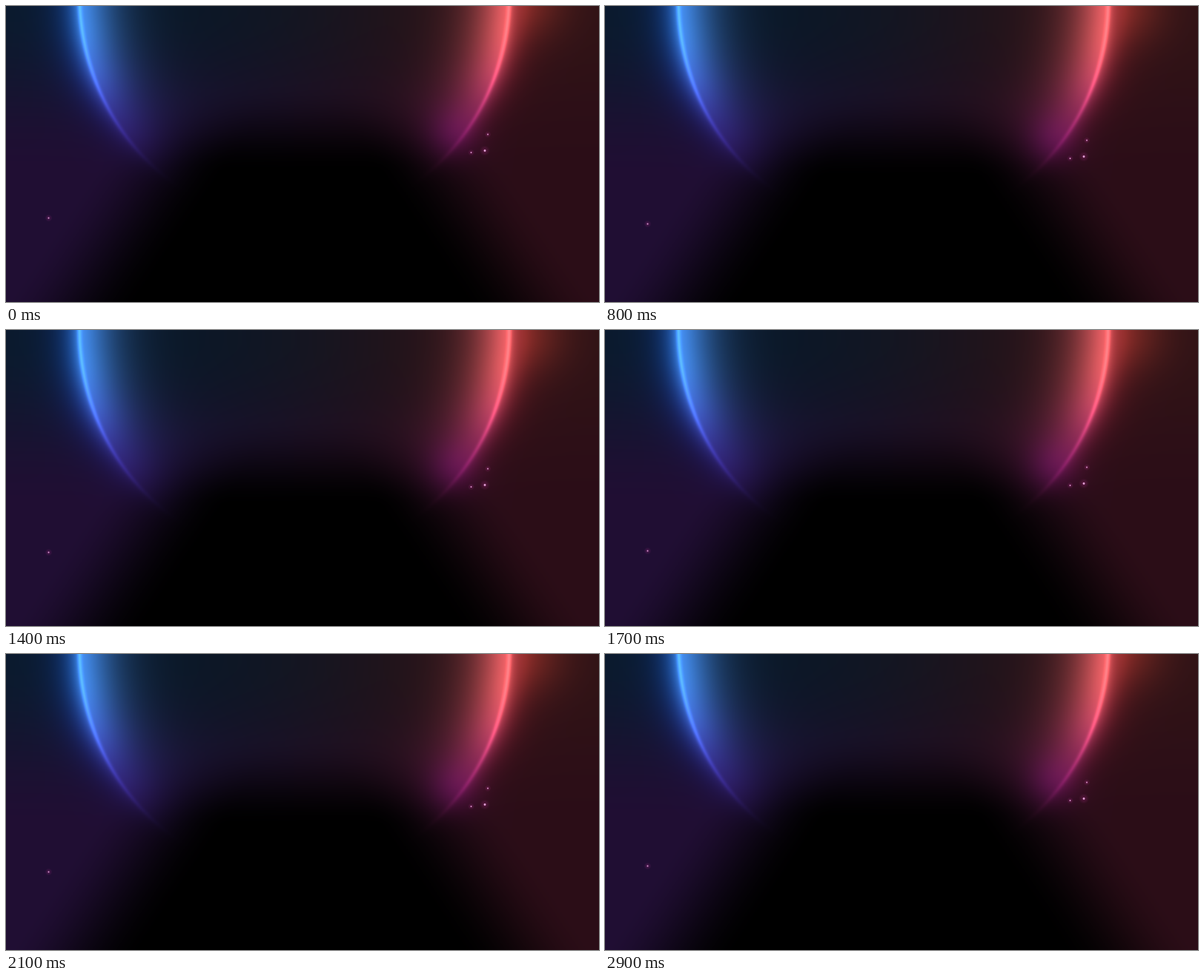
An HTML page with a canvas that plays this animation: 800 px wide and 400 px high, repeating every 3 s.

```html
<!DOCTYPE html>
<html lang="en">
<head>
<meta charset="utf-8">
<title>Glowing ring</title>
<style>
  html, body { margin: 0; width: 100%; height: 100%; overflow: hidden; background: #000; }
  canvas { display: block; width: 800px; height: 400px; }
</style>
</head>
<body>
<canvas id="stage" width="800" height="400"></canvas>
<script>
const start = performance.now();
const W = 800, H = 400, TRAVEL = 14;
const STEP = 100, STEPS = 30, REFRESH = 17;
const ring = { x: 388.5, y: -16, rx: 290, ry: 308 };

const blue = { skyTop: [11, 26, 44], skyLow: [32, 14, 51], rimTop: [72, 145, 245], rimLow: [58, 50, 190], reach: [11, 15, 20] };
const red = { skyTop: [48, 19, 22], skyLow: [43, 13, 23], rimTop: [240, 98, 100], rimLow: [165, 36, 122], reach: [17, 12, 13] };

const sparks = [
  { x: 57.5, y: 286.5, r: 1 },
  { x: 650, y: 173.5, r: 0.9 },
  { x: 627.5, y: 198, r: 0.9 },
  { x: 646, y: 195.5, r: 1.4 }
];

const clamp = v => Math.min(1, Math.max(0, v));
const mix = (a, b, t) => a + (b - a) * t;
const mixColour = (a, b, t) => a.map((v, i) => mix(v, b[i], t));
const smooth = (a, b, v) => { const t = clamp((v - a) / (b - a)); return t * t * (3 - 2 * t); };
const gauss = (dx, dy, s) => Math.exp(-(dx * dx + dy * dy) / (2 * s * s));

const skyAt = (side, y) => mixColour(side.skyTop, side.skyLow, smooth(0, 230, y));

function rimAt(side, y) {
  const fade = 1 - smooth(80, 268, y);
  return mixColour(side.rimTop, side.rimLow, smooth(20, 200, y)).map(v => v * fade);
}

// Light left visible around the dark dome
function visibility(x, y) {
  const side = Math.abs(x - 398) - (210 + (y - 250) * 0.67);
  return 1 - (1 - smooth(-92, 92, side)) * (1 - smooth(-52, 70, 172 - y));
}

// A thin bright line, a wide glow inside it and a short one outside
function rimLight(d, y, reach) {
  const line = 0.32 * Math.exp(-d * d / 9);
  const body = mix(0.82, 0.58, smooth(20, 200, y));
  const falloff = d < 0 ? Math.exp(-Math.pow(-d / 48, 1.4)) : Math.exp(-d / reach);
  return line + body * falloff;
}

function paintScene() {
  const scene = document.createElement("canvas");
  scene.width = W;
  scene.height = H + TRAVEL;
  const g = scene.getContext("2d");
  const image = g.createImageData(W, H + TRAVEL);
  let p = 0;
  for (let row = 0; row < H + TRAVEL; row++) {
    const y = row - TRAVEL;
    const leftSky = skyAt(blue, y), rightSky = skyAt(red, y);
    const leftRim = rimAt(blue, y), rightRim = rimAt(red, y);
    const dy = (y - ring.y) * ring.rx / ring.ry;
    for (let x = 0; x < W; x++) {
      const isLeft = x < ring.x;
      const rim = isLeft ? leftRim : rightRim;
      const reach = (isLeft ? blue : red).reach;
      const d = Math.hypot(x - ring.x, dy) - ring.rx;
      const sky = mixColour(leftSky, rightSky, Math.pow(smooth(120, 720, x), 1.4));
      const dim = 1 - 0.1 * smooth(0, -60, d);
      const light = visibility(x, y);
      const violet = gauss(x - 602, y - 175, 26);
      const ember = gauss(x - 706, y + 8, 36) * smooth(0, 25, d);
      const extra = [violet * 20 + ember * 48, ember * 16, violet * 26 + ember * 9];
      for (let c = 0; c < 3; c++) {
        image.data[p++] = light * (sky[c] * dim + rim[c] * rimLight(d, y, reach[c]) + extra[c]);
      }
      image.data[p++] = 255;
    }
  }
  g.putImageData(image, 0, 0);
  for (const { x, y, r } of sparks) paintSpark(g, x, y + TRAVEL, r);
  return scene;
}

function paintSpark(g, x, y, r) {
  const halo = g.createRadialGradient(x, y, 0, x, y, r * 5);
  halo.addColorStop(0, "rgba(190, 50, 150, 0.3)");
  halo.addColorStop(1, "rgba(190, 50, 150, 0)");
  g.fillStyle = halo;
  g.fillRect(x - 8, y - 8, 16, 16);
  g.fillStyle = "rgba(250, 185, 240, 0.85)";
  g.beginPath();
  g.arc(x, y, r, 0, Math.PI * 2);
  g.fill();
}

const ctx = document.getElementById("stage").getContext("2d");
const scene = paintScene();

// The picture drifts down a pixel per step, rests, and climbs back.
// A refresh of lead puts each step on screen on time.
function draw() {
  const time = performance.now() - start + REFRESH;
  const step = Math.floor(time / STEP) % STEPS;
  const drop = Math.min(step, STEPS - 1 - step);
  ctx.drawImage(scene, 0, drop - TRAVEL);
  requestAnimationFrame(draw);
}
draw();
</script>
</body>
</html>
```
